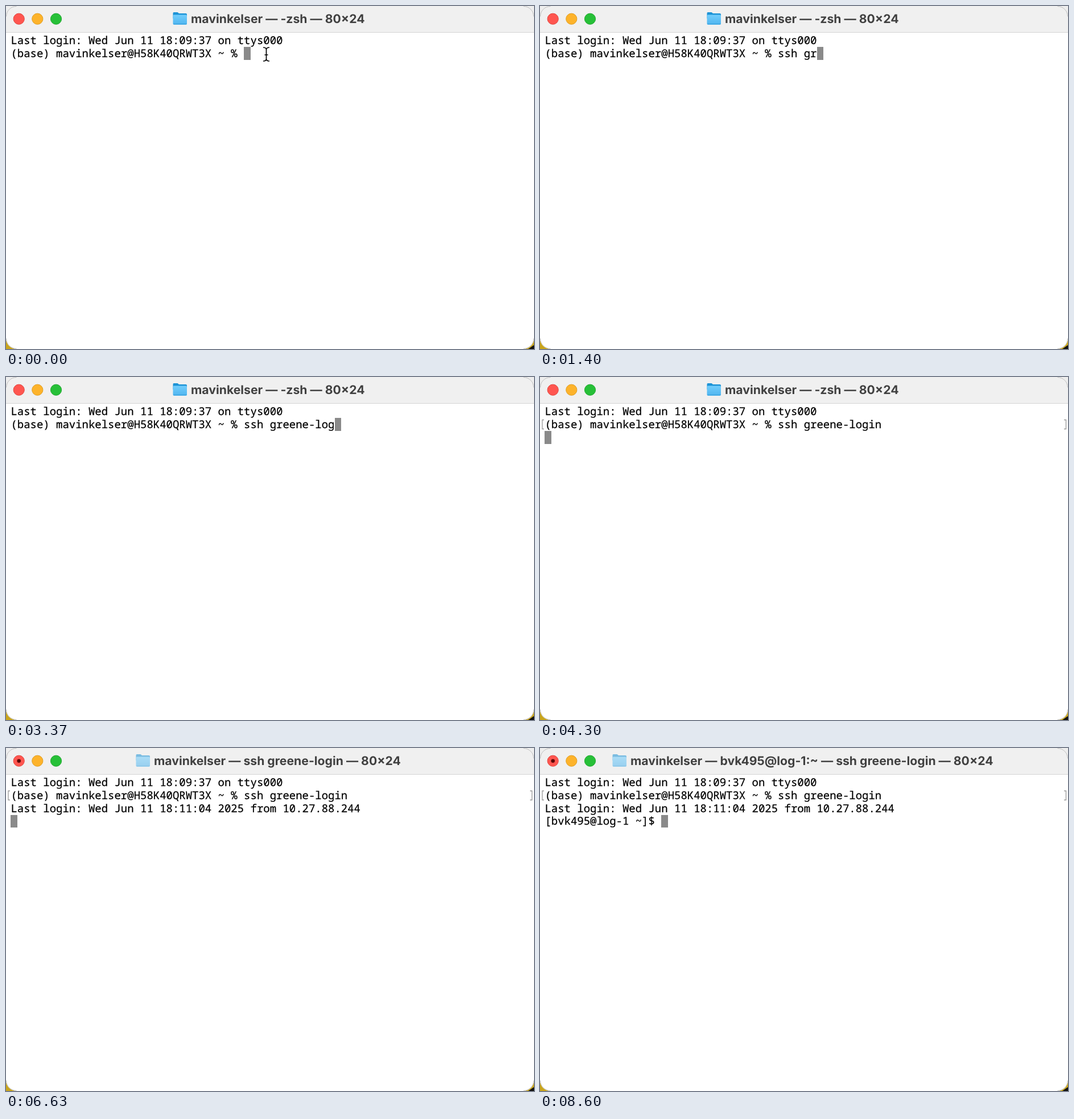
Write an HTML page that moves like this. It is 928 px wide and 604 px high and loops after 8.66 s.

```html
<!DOCTYPE html>
<html lang="en">
<head>
<meta charset="utf-8">
<title>Terminal login</title>
<style>
  html, body { margin: 0; width: 100%; height: 100%; overflow: hidden; background: #fff; }
  svg { display: block; width: 928px; height: 604px; text-rendering: geometricPrecision; }
  #title { font: 700 21.2px Inter, sans-serif; fill: #404040; }
  #lines { font: 500 18.98px "Noto Sans Mono", monospace; fill: #000; stroke: #000; stroke-width: .25px; }
  #ibeam, #marks, #edges { fill: none; }
</style>
</head>
<body>
<svg viewBox="0 0 928 604">
  <defs>
    <clipPath id="window"><rect width="928" height="604" rx="18.5"/></clipPath>
    <linearGradient id="front" x2="0" y2="1">
      <stop stop-color="#72cdfc"/><stop offset="1" stop-color="#4fb5ef"/>
    </linearGradient>
    <path id="beam" d="M452 73Q457.5 73 457.5 77V93Q457.5 97 452 97M463 73Q457.5 73 457.5 77M457.5 93Q457.5 97 463 97M454.5 86H460.5"/>
  </defs>

  <!-- Desktop showing behind the rounded corners -->
  <rect width="928" height="300" fill="#eee"/>
  <path d="M0 580H30V604H0zM900 580H928V604H900z" fill="#c9a51c"/>
  <path d="M918 604L928 597V604z" fill="#111"/>

  <g clip-path="url(#window)">
    <rect width="928" height="604" fill="#fff"/>
    <rect width="928" height="46" fill="#f0f0f0"/>
    <rect y="46" width="928" height="1" fill="#d4d4d4"/>
  </g>
  <path id="edges" d="M.5 18.5A18 18 0 0 1 18.5 .5M909.5 .5A18 18 0 0 1 927.5 18.5M927.5 585.5A18 18 0 0 1 909.5 603.5M18.5 603.5A18 18 0 0 1 .5 585.5" stroke="#bcbcbc"/>

  <g stroke-width="1">
    <circle cx="22.7" cy="22.7" r="9.6" fill="#ff5650" stroke="#e2463f"/>
    <circle cx="55.3" cy="22.7" r="9.6" fill="#fdb32b" stroke="#e09e22"/>
    <circle cx="88" cy="22.7" r="9.6" fill="#27c038" stroke="#1fa82e"/>
    <circle id="busy" cx="22.7" cy="22.7" r="3.3" fill="#5a0805"/>
  </g>

  <g id="folder">
    <path d="M2 11H8.5L11 13H23Q25 13 25 15V22H.5V13Q.5 11 2 11z" fill="#1d93d6"/>
    <rect x=".5" y="15.5" width="24.5" height="17.5" rx="2" fill="url(#front)"/>
    <path d="M1 31.5H24.5" stroke="#3da3dd"/>
  </g>
  <text id="title" y="29.5"></text>

  <rect id="cursor" width="11.5" height="22.7" fill="#8a8a8a" shape-rendering="crispEdges"/>
  <g id="lines"></g>
  <path id="marks" d="M7 75.5H4V91.5H7M921 75.5H924.5V91.5H921" stroke="#999" stroke-width="1.3"/>

  <g id="ibeam">
    <use href="#beam" stroke="#fff" stroke-width="4"/>
    <use href="#beam" stroke="#000" stroke-width="1.7"/>
  </g>
</svg>

<script>
const LOOP = 8660;
const LEFT = 8.4, CELL = 11.388, ROW = 22.7;
const USER = "mavinkelser", REMOTE = "bvk495@log-1";
const COMMAND = "ssh greene-login";
const PROMPT = `(base) ${USER}@H58K40QRWT3X ~ % `;
const REMOTE_PROMPT = `[${REMOTE} ~]$ `;

// Moments of each keystroke and of each later event, in ms
const KEYS = [400, 530, 670, 870, 1070, 1270, 1600, 1800, 2000, 2200, 2500, 2900, 3060, 3230, 3400, 3600];
const ENTER = 4070, CONNECTING = 4400, CONNECTED = 6130, READY = 6800;

const el = id => document.getElementById(id);
const show = (id, visible) => el(id).setAttribute("visibility", visible ? "visible" : "hidden");

const rows = [0, 1, 2, 3].map(i => {
  const row = document.createElementNS("http://www.w3.org/2000/svg", "text");
  row.setAttribute("x", LEFT);
  row.setAttribute("y", 67.2 + i * ROW);
  return el("lines").appendChild(row);
});

function screenAt(t) {
  const typed = COMMAND.slice(0, KEYS.filter(key => t >= key).length);
  const lines = ["Last login: Wed Jun 11 18:09:37 on ttys000", PROMPT + typed];
  if (t >= ENTER) lines.push("");
  if (t >= CONNECTED) lines.splice(2, 0, "Last login: Wed Jun 11 18:11:04 2025 from 10.27.88.244");
  if (t >= READY) lines[3] = REMOTE_PROMPT;
  return lines;
}

function titleAt(t) {
  if (t < CONNECTING) return [325, `${USER} — -zsh — 80×24`];
  if (t < READY) return [260, `${USER} — ${COMMAND} — 80×24`];
  return [159, `${USER} — ${REMOTE}:~ — ${COMMAND} — 80×24`];
}

function draw() {
  const t = performance.now() % LOOP;
  const lines = screenAt(t);
  rows.forEach((row, i) => row.textContent = lines[i] || "");

  const last = lines.length - 1;
  el("cursor").setAttribute("x", LEFT + lines[last].length * CELL);
  el("cursor").setAttribute("y", 49.4 + last * ROW);

  const [x, title] = titleAt(t);
  el("title").setAttribute("x", x);
  el("title").textContent = title;
  el("folder").setAttribute("transform", `translate(${x - 32})`);
  el("folder").setAttribute("opacity", t < CONNECTING ? 1 : 0.55);

  show("busy", t >= CONNECTING);
  show("marks", t >= ENTER);
  show("ibeam", t < KEYS[0]);
  requestAnimationFrame(draw);
}
draw();
</script>
</body>
</html>
```
